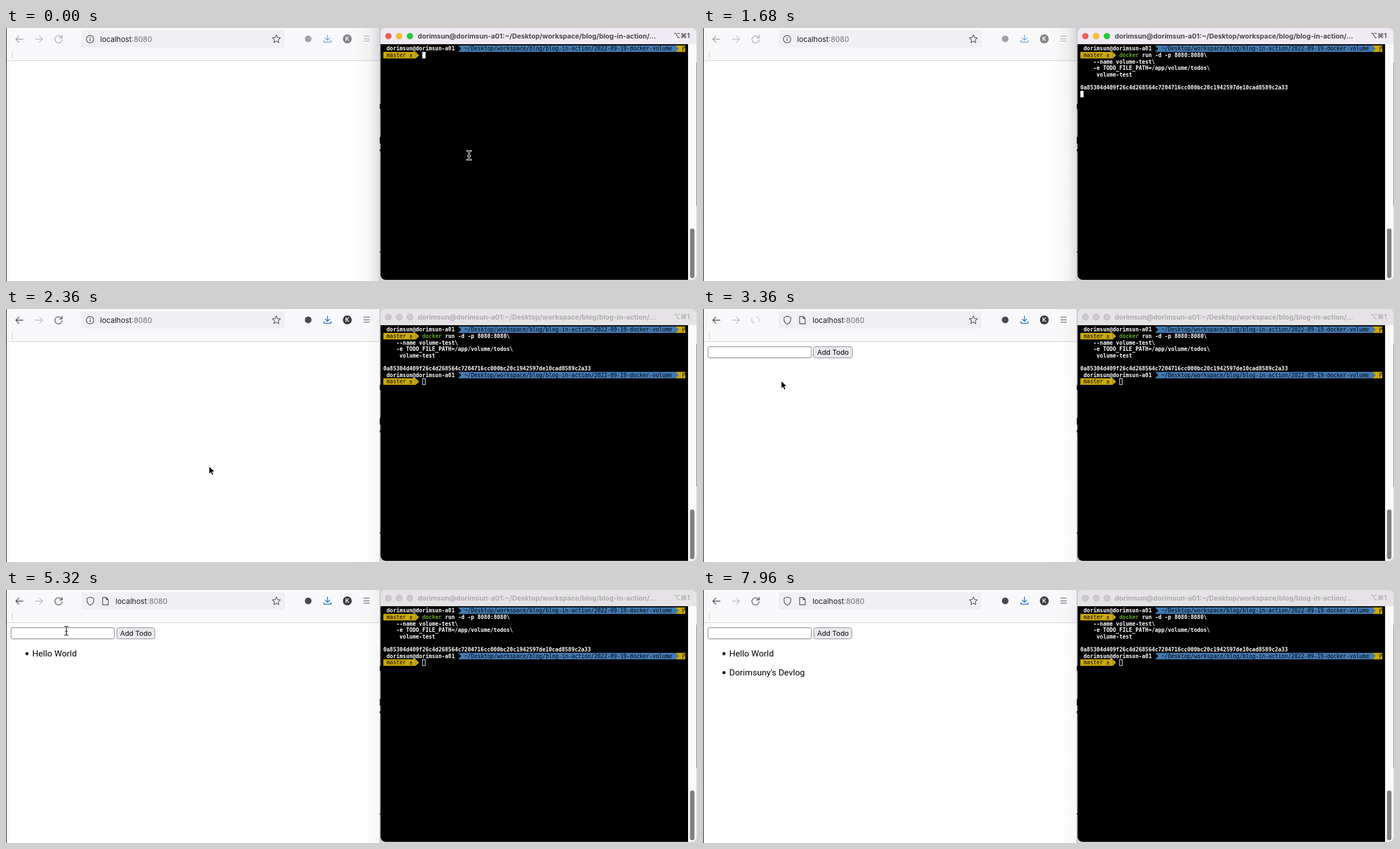
Write an HTML page with a canvas that moves like this. It is 1237x453 px and loops after 8 s.

```html
<!DOCTYPE html>
<html lang="en">
<head>
<meta charset="utf-8">
<title>Todo list in a container</title>
<style>
  html, body { margin: 0; width: 100%; height: 100%; overflow: hidden; background: #fff; }
  canvas { display: block; }
</style>
</head>
<body>
<canvas id="stage" width="1237" height="453"></canvas>
<script>
const ctx = document.getElementById('stage').getContext('2d');
const LOOP = 8000, STEP = 40;

const UI = 'Inter, "DejaVu Sans", sans-serif';
const PAGE = 'Roboto, sans-serif';
const MONO = '"DejaVu Sans Mono", monospace';

const USER = 'dorimsun', HOST = 'dorimsun-a01';
const PATH = '~/Desktop/workspace/blog/blog-in-action/';
const COMMAND = ['run -d -p 8080:8080\\', '    --name volume-test\\',
  '    -e TODO_FILE_PATH=/app/volume/todos\\', '     volume-test'];
const CONTAINER = '0a85304d409f26c4d268564c7204716cc000bc20c1942597de10cad8589c2a33';
const TODOS = ['Hello World', "Dorimsuny's Devlog"];

const T = { paste: 400, enter: 1440, id: 1560, prompt: 1760, activate: 2160, load: 3160,
  add: [4840, 7520] };

// Runs of keystrokes: todo index, first key time, interval, number of keys
const KEYS = [[0, 3920, 72, 11], [1, 5760, 64, 6], [1, 6640, 120, 3], [1, 6960, 55, 9]];
// Input focus: fade-in start, fade-out start
const FOCUS = [[3520, 4760], [5320, 7440]];
// Pointer path: time, x, y
const POINTER = [[1720, 829, 228], [2160, 378, 272], [2360, 363.5, 282], [2560, 338.5, 287],
  [2920, 338.5, 287], [3360, 140, 129], [3560, 108, 73], [LOOP, 108, 73]];

const clamp = v => Math.max(0, Math.min(1, v));
const within = (t, a, b) => t >= a && t < b;

function rect(x, y, w, h, color) {
  ctx.fillStyle = color;
  ctx.fillRect(x, y, w, h);
}

function box(x, y, w, h, r, fill, stroke, width = 1) {
  ctx.beginPath();
  ctx.roundRect(x, y, w, h, r);
  paint(fill, stroke, width);
}

function disc(x, y, r, fill, stroke, width = 1) {
  ctx.beginPath();
  ctx.arc(x, y, r, 0, 2 * Math.PI);
  paint(fill, stroke, width);
}

function paint(fill, stroke, width) {
  if (fill) { ctx.fillStyle = fill; ctx.fill(); }
  if (stroke) { ctx.strokeStyle = stroke; ctx.lineWidth = width; ctx.stroke(); }
}

function shape(x, y, d, fill, stroke, width) {
  ctx.save();
  ctx.translate(x, y);
  const path = new Path2D(d);
  ctx.lineCap = ctx.lineJoin = 'round';
  if (fill) { ctx.fillStyle = fill; ctx.fill(path); }
  if (stroke) { ctx.strokeStyle = stroke; ctx.lineWidth = width || 1.2; ctx.stroke(path); }
  ctx.restore();
}

function text(str, x, y, font, color, align = 'left') {
  ctx.font = font;
  ctx.fillStyle = color;
  ctx.textAlign = align;
  ctx.fillText(str, x, y);
  return ctx.measureText(str).width;
}

// ---- Browser ----

function drawToolbar(t) {
  const active = t >= T.activate, loaded = t >= T.load;
  const icon = active ? '#4a4a52' : '#a2a2a8';
  const ink = '#4f4f57';
  rect(0, 0, 669, 58, '#f9f9fb');
  rect(0, 58, 669, 1, '#cfcfd3');
  rect(11, 42, 1, 12, '#c9c9cd');

  shape(24, 20, 'M6.5 0H-6.5M-1 -5.5L-6.5 0L-1 5.5', null, icon, 1.3);
  shape(59, 20, 'M-6.5 0H6.5M1 -5.5L6.5 0L1 5.5', null, '#bcbcc1', 1.3);
  if (within(t, T.load, 3480)) {
    shape(94, 20, 'M-6 -3.5A7 7 0 0 0 -5 5M1 -6.5A7 7 0 0 1 6 3.5M-5 5V1M-5 5H-1', null, '#c6c6cb');
  } else {
    shape(94, 20, 'M5.4 -3.4A6.5 6.5 0 1 0 6.5 1M6.5 -7V-2.2H1.7', null, icon, 1.3);
  }

  box(135, 4, 364, 31, 4, '#f0f0f4');
  let x = 168.5;
  if (loaded) {
    x = 196;
    shape(151, 20, 'M0 -7.3L6 -5V-1Q6 4.5 0 7.3Q-6 4.5 -6 -1V-5Z', null, ink, 1.3);
    shape(178, 20, 'M-5 -6.5H1.5L5 -3V6.5H-5ZM1.5 -6.5V-3H5', null, ink, 1.3);
  } else {
    disc(150.5, 20, 6.6, null, ink, 1.3);
    rect(149.8, 19, 1.5, 4.6, ink);
    rect(149.8, 16.2, 1.5, 1.6, ink);
  }
  x += text('localhost', x, 25, '13.2px ' + UI, '#1c1b22');
  text(':8080', x, 25, '13.2px ' + UI, '#707078');

  const star = Array.from({ length: 10 }, (_, i) => {
    const a = i * Math.PI / 5, r = i % 2 ? 3.6 : 7.6;
    return (r * Math.sin(a)).toFixed(2) + ' ' + (-r * Math.cos(a)).toFixed(2);
  });
  shape(484, 20, 'M' + star.join('L') + 'Z', null, ink, 1.2);

  disc(541, 19.5, 6, icon);
  shape(575.5, 19, 'M0 -6.5V3M-4 -1L0 3L4 -1M-6.3 3.5V6.5H6.3V3.5', null,
    active ? '#1c6fc4' : '#6ba7dc', 1.4);
  disc(611, 19.5, 8, active ? '#3d3d42' : '#858588');
  text('K', 611, 23.4, '600 10.5px ' + UI, '#fff', 'center');
  for (const y of [14, 19, 23]) rect(640, y, 11, 1, icon);
}

function drawInput(t) {
  const focus = Math.max(...FOCUS.map(([on, off]) => Math.min(clamp((t - on) / 160), clamp(1 - (t - off) / 120))));
  box(9, 67.5, 185, 20, 2.5, '#fff', '#73737c');
  if (focus > 0) {
    ctx.globalAlpha = focus;
    box(6.5, 64.5, 191, 26, 5, null, '#c6e3fb', 3);
    box(9, 67, 186, 21, 2.5, '#fff', '#0a6be0', 2);
    ctx.globalAlpha = 1;
  }

  let typed = '', lastKey = FOCUS[0][0];
  for (const [todo, start, gap, count] of KEYS) {
    if (t < start || t >= T.add[todo]) continue;
    const n = Math.min(count, Math.floor((t - start) / gap) + 1);
    typed += TODOS[todo].substr(typed.length, n);
    lastKey = start + (n - 1) * gap;
  }
  const width = text(typed, 12.5, 82, '12.3px ' + UI, '#000');
  if (typed && within(t - lastKey, 40, 240)) rect(12.5 + width, 70, 1, 15, '#000');
}

function drawPage(t) {
  if (t < T.load) return;
  drawInput(t);
  if (t < T.add[0]) box(197.5, 67.5, 70, 20, 4, '#e9e9ed', '#85858f');
  else box(198.5, 67.5, 68, 20, 4, '#e9e9ed', '#85858f');
  text('Add Todo', 232.7, 82, '12.3px ' + UI, '#000', 'center');
  TODOS.forEach((todo, i) => {
    if (t < T.add[i]) return;
    disc(37.5, 114 + 34 * i, 2.7, '#000');
    text(todo, 47, 119 + 34 * i, '15.5px ' + PAGE, '#000');
  });
}

function drawBrowser(t) {
  rect(0, 0, 1237, 453, '#fff');
  drawToolbar(t);
  drawPage(t);
  const active = t >= T.activate;
  const shade = ctx.createLinearGradient(625, 0, 669, 0);
  shade.addColorStop(0, 'rgba(0,0,0,0)');
  shade.addColorStop(0.6, `rgba(0,0,0,${active ? 0.012 : 0.035})`);
  shade.addColorStop(1, `rgba(0,0,0,${active ? 0.035 : 0.13})`);
  rect(625, 0, 44, 453, shade);
  rect(0, 0, 1, 453, '#000');
}

// ---- Terminal ----

const CELL = 5.8125, LINE = 11.62, LEFT = 675.5, TOP = 31.2;
const BLUE = '#427ab3', YELLOW = '#cda907';
const col = c => LEFT + c * CELL;
const row = r => TOP + r * LINE;

function print(str, c, r, color = '#fff', weight = 'bold') {
  text(str, col(c), row(r) + 9.1, weight + ' 9.654px ' + MONO, color);
}

function cells(c, r, count, color) {
  rect(col(c), row(r), count * CELL, LINE, color);
}

function chevron(c, r, color) {
  shape(col(c), row(r), `M0 0L${CELL} ${LINE / 2}L0 ${LINE}Z`, color);
}

function drawPrompt(r) {
  print(USER + '@' + HOST, 1, r);
  cells(23, r, 67, BLUE);
  chevron(23, r, '#000');
  print(PATH + '2022-09-19-docker-volume', 25, r, '#000', 'normal');
  cells(90, r, 3, YELLOW);
  chevron(90, r, BLUE);
  shape(col(92), row(r), 'M1.3 2V10M1.3 7L4.5 5V2M3.3 3.3L4.5 2L5.5 3.3', null, '#222', 1);
  cells(0, r + 1, 10, YELLOW);
  chevron(10, r + 1, YELLOW);
  print('master ±', 1, r + 1, '#000', 'normal');
}

function drawShell(t) {
  drawPrompt(0);
  let caret = [12, 1];
  if (t >= T.paste) {
    print('docker', 12, 1, '#62a824');
    COMMAND.forEach((line, i) => print(line, i ? 0 : 19, 1 + i));
    caret = [0, 5];
  }
  if (t >= T.enter) caret = [0, 6];
  if (t >= T.id) {
    print(CONTAINER, 0, 6);
    caret = [0, 7];
  }
  if (t >= T.prompt) {
    drawPrompt(7);
    caret = [12, 8];
  }
  const x = col(caret[0]), y = row(caret[1]);
  if (t < T.activate) rect(x, y, CELL, LINE, '#fff');
  else {
    ctx.strokeStyle = '#fff';
    ctx.lineWidth = 1;
    ctx.strokeRect(x + 0.5, y + 0.5, CELL - 1, LINE - 1);
  }
}

function drawTerminal(t) {
  const active = t < T.activate;
  // Slivers of the windows behind
  rect(669, 0, 568, 453, '#d4d4d6');
  rect(669, 0, 1, 453, '#b4b4b6');
  for (const [y, h] of [[136, 9], [195, 12], [217, 4], [400, 2]]) rect(669, y, 2, h, '#222');
  rect(1236, 62, 1, 256, '#777');

  ctx.save();
  ctx.beginPath();
  ctx.roundRect(670.5, 0, 565.5, 451, 9);
  ctx.clip();
  rect(670, 0, 566, 29, active ? '#f0ebf3' : '#e5e3e5');
  rect(670, 29, 551, 422, '#000');
  rect(1221, 29, 15, 422, '#fafafa');
  box(1224.5, 359, 8, 89, 4, '#808080');
  ['#fe5f57', '#febc2e', '#28c840'].forEach((color, i) =>
    disc(684.5 + 19.3 * i, 14.5, 5.6, active ? color : '#cbc9cb', active ? 'rgba(0,0,0,.12)' : '#b9b7b9', 0.8));
  const ink = active ? '#4b484d' : '#aeacae';
  text(`${USER}@${HOST}:${PATH}...`, 737, 18.6, 'bold 12.2px ' + UI, ink);
  text('⌥⌘1', 1224, 18.2, '600 12px ' + UI, ink, 'right');
  drawShell(t);
  ctx.restore();
}

// ---- Pointer ----

function drawBeam(x, y) {
  const d = 'M-3.5 -8Q0 -8 0 -5.5Q0 -8 3.5 -8M0 -5.5V5.5M-3.5 8Q0 8 0 5.5Q0 8 3.5 8M-2 1H2';
  shape(x, y, d, null, '#fff', 3);
  shape(x, y, d, null, '#000', 1.2);
}

function drawArrow(x, y) {
  shape(x, y, 'M0 0V13.5L3.2 10.6L5.4 15.6L8 14.5L5.8 9.6H10Z', '#000', '#fff', 1);
}

function drawPointer(t) {
  if (t < T.enter) return drawBeam(829, 228);
  if (!within(t, POINTER[0][0], KEYS[0][1]) && !within(t, FOCUS[1][0], KEYS[1][1])) return;
  const i = POINTER.findIndex(p => p[0] > t);
  const [t0, x0, y0] = POINTER[i - 1], [t1, x1, y1] = POINTER[i];
  const k = (t - t0) / (t1 - t0), ease = k * k * (3 - 2 * k);
  const x = x0 + (x1 - x0) * ease, y = y0 + (y1 - y0) * ease;
  if (x > 671 || (t >= T.load && x < 195 && y < 89)) drawBeam(x, y);
  else drawArrow(x, y);
}

function frame() {
  const t = Math.floor(performance.now() % LOOP / STEP) * STEP;
  drawBrowser(t);
  drawTerminal(t);
  drawPointer(t);
  requestAnimationFrame(frame);
}
frame();
</script>
</body>
</html>
```
